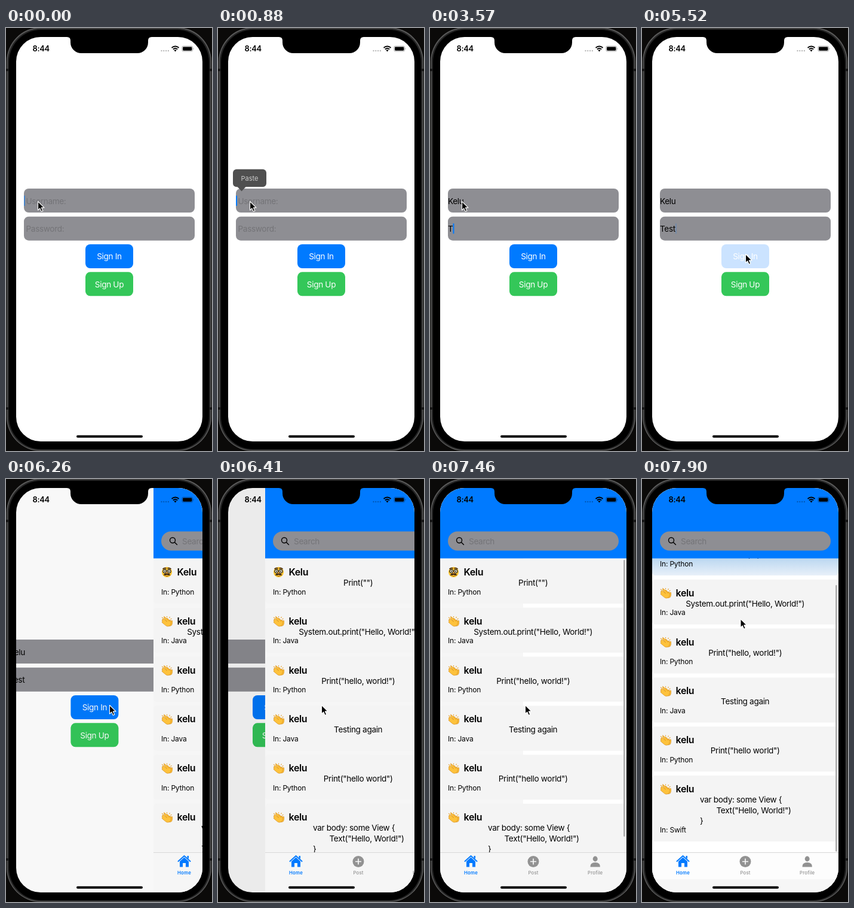
An HTML page for the animation above (8000 ms loop, 345 px wide and 706 px high).

```html
<!DOCTYPE html>
<html lang="en">
<head>
<meta charset="utf-8">
<title>Sign in and browse snippets</title>
<style>
  html, body { margin: 0; height: 100%; overflow: hidden; background: #0b0a09; }
  svg { display: block; width: 100%; height: 100%; }
  text { font: 13.6px Inter, sans-serif; letter-spacing: -.025em; white-space: pre; }
  .mid { text-anchor: middle; }
  .hint { fill: #747478; }
  .title { font-size: 16px; font-weight: 600; letter-spacing: -.022em; }
  .small { font-size: 12px; letter-spacing: -.016em; }
  .clock { font-size: 12.8px; font-weight: 600; letter-spacing: -.02em; }
  .paste { font-size: 11px; letter-spacing: 0; fill: #ccc; }
  .tab { font-size: 7.8px; font-weight: 500; letter-spacing: .02em; }
</style>
</head>
<body>
<svg viewBox="0 0 345 706">
  <defs>
    <clipPath id="screen"><rect x="17" y="15" width="312" height="675" rx="41"/></clipPath>
    <linearGradient id="tint" x2="0" y2="1">
      <stop offset=".6" stop-color="#b9d6f0"/><stop offset="1" stop-color="#e8f0f9"/>
    </linearGradient>
    <g id="face">
      <circle r="8.6" fill="#fdc530"/>
      <path d="M-7-5q3-3 6-1M1-6q3-2 6 1" fill="none" stroke="#3b2414" stroke-width="1.6"/>
      <g fill="#fff3d0" stroke="#222" stroke-width="1.3">
        <circle cx="-3.6" cy="-1.4" r="2.9"/><circle cx="3.6" cy="-1.4" r="2.9"/>
      </g>
      <circle cx="-3.4" cy="-1.2" r="1"/><circle cx="3.4" cy="-1.2" r="1"/>
      <path d="M0-1q2 2 1.500 4h-3q-.5-2 1.500-4" fill="#eea33b"/>
      <path d="M0 2.500q3-1 6 2.500-3 1.500-6-.5-3 2-6 .5 3-3.500 6-2.500" fill="#3b2414"/>
      <path d="M-2 6.500q2 1 4 0" fill="none" stroke="#8a4b12"/>
    </g>
    <g id="clap">
      <g fill="#fdc23c" stroke="#d98e1c" stroke-width=".7" stroke-linejoin="round">
        <path d="M-1-4q1.500-1.500 2.500 0l5 5q1-3 2.500-1.500.5 5-1 7.500-4 3-8-1z"/>
        <path d="M-7-2q-1-2 1-2l6 5-5-6q0-2 2-1.500l7 7q0-3 2-2 2 5 0 8-4 4-8 1l-6-5q-1-2 1-2l-1-1q-1-2 1-1.500"/>
      </g>
      <path d="M-5-8l1 2M-8.500-6l2 1M0-8v2M5-7l-1 2M8-4l-2 1" stroke="#e8a12b" stroke-width="1.1"/>
    </g>
  </defs>

  <rect x="1" y="-1" width="343" height="707" rx="57" fill="#5a5a5a"/>
  <rect x="2.500" y=".8" width="340" height="704" rx="56" fill="#262626"/>
  <rect x="5" y="3" width="335" height="700" rx="54"/>
  <path d="M1 70h4M340 70h4M1 635h4M340 635h4" stroke="#171717" stroke-width="4"/>

  <g clip-path="url(#screen)">
    <rect x="17" y="15" width="312" height="675" fill="#fff"/>
    <g id="login">
      <g fill="#8e8e93">
        <rect x="30" y="268" width="286" height="40" rx="8"/>
        <rect x="30" y="314.700" width="286" height="40" rx="8"/>
      </g>
      <text id="nameHint" class="hint" x="33.500" y="293.500">Username:</text>
      <text id="passHint" class="hint" x="33.500" y="340">Password:</text>
      <text id="nameText" x="30" y="293.500"></text>
      <text id="passText" x="30" y="340"></text>
      <rect id="caret" width="2" height="17.500" rx="1" fill="#007aff"/>
      <g id="signIn">
        <rect x="133" y="361" width="80" height="40" rx="8" fill="#007aff"/>
        <text class="mid" x="173" y="386" fill="#fff">Sign In</text>
      </g>
      <rect x="133" y="407.300" width="80" height="40" rx="8" fill="#34c759"/>
      <text class="mid" x="173" y="432.500" fill="#fff">Sign Up</text>
      <g id="popup">
        <path d="M32 264.500h15l-7.500 8z" fill="#4f4f4f"/>
        <rect x="25" y="235.700" width="56" height="29.500" rx="6" fill="#4f4f4f"/>
        <text class="mid paste" x="53" y="254.500">Paste</text>
      </g>
    </g>
    <rect id="dim" x="17" y="15" width="312" height="675"/>

    <g id="home">
      <rect x="17" y="15" width="312" height="675" fill="#f6f6f6"/>
      <rect id="gaps" y="132" width="312" height="492" fill="#fff"/>
      <g id="list"></g>
      <rect id="scrollbar" x="324" width="2.800" rx="1.400" fill="#b0b0b0"/>
      <rect x="17" y="15" width="312" height="117.500" fill="#007aff"/>
      <rect x="30" y="87.500" width="286" height="32" rx="16" fill="#8e8e93"/>
      <g fill="none" stroke="#000" stroke-width="1.400">
        <circle cx="49" cy="102.300" r="4.500"/><path d="M52.300 105.600l4.500 4.500"/>
      </g>
      <text class="hint" x="65" y="108.500">Search</text>
      <rect x="17" y="623.500" width="312" height="67" fill="#f6f6f6"/>
      <rect id="barLight" x="17" y="623.500" width="312" height="44.500" fill="#fdfdfd"/>
      <path d="M17 623.500h312" stroke="#d8d8d8"/>
      <g fill="#007aff">
        <path d="M58.500 638l10-9 10 9" fill="none" stroke="#007aff" stroke-width="2" stroke-linecap="round"/>
        <path d="M73.500 629h2.500v5l-2.500-2zM61 638.300l7.500-6.800 7.500 6.800v9.200h-5v-6.500h-5v6.500h-5z"/>
        <text class="tab mid" x="68.500" y="659.500" style="font-weight:600">Home</text>
      </g>
      <g fill="#929292">
        <circle cx="173" cy="638.500" r="9.500"/>
        <path d="M173 633.500v10M168 638.500h10" stroke="#f8f8f8" stroke-width="1.700"/>
        <text class="tab mid" x="173" y="659.500">Post</text>
        <ellipse cx="276.700" cy="634" rx="4" ry="4.400"/>
        <path d="M268.500 647.500q-.5-7.500 8.200-7.500t8.200 7.500z"/>
        <text class="tab mid" x="276.700" y="659.500">Profile</text>
      </g>
    </g>

    <text class="clock" x="44.500" y="39.300">8:44</text>
    <path d="M260.500 38h14" stroke="#000" stroke-opacity=".27" stroke-width="2.400" stroke-linecap="round" stroke-dasharray="0 3.800"/>
    <g fill="none" stroke="#000" stroke-width="1.900">
      <path d="M277.500 33q6-5 12 0M279.800 35.500q3.700-3 7.400 0"/>
    </g>
    <path d="M281.300 37q2.200-1.600 4.400 0l-2.200 2.500z"/>
    <rect x="294.700" y="30.200" width="18" height="8.800" rx="2.500" fill="none" stroke="#000" stroke-opacity=".4" stroke-width=".8"/>
    <rect x="296" y="31.500" width="15.400" height="6.200" rx="1.400"/>
    <path d="M313.700 33.300q1.600 1.300 0 2.600z" opacity=".5"/>
    <rect x="118" y="679.700" width="111" height="4" rx="2"/>
  </g>
  <path d="M102 14v1q6 0 6 6v3a18 18 0 0 0 18 18h94a18 18 0 0 0 18-18v-3q0-6 6-6v-1z"/>
  <path id="pointer" d="M0 0v14.500l3.300-3.100 2.400 5.400 2.600-1.100-2.400-5.300h4.600z" stroke="#fff" stroke-width="1.100" stroke-linejoin="round"/>
</svg>
<script>
const LOOP = 8000, TICK = 149, WIDTH = 312;
const el = id => document.getElementById(id);
const set = (id, attrs) => Object.entries(attrs).forEach(([key, value]) => el(id).setAttribute(key, value));
const move = (id, x, y) => set(id, { transform: `translate(${x} ${y})` });

const posts = [
  ['face', 'Kelu', 'Python', 'Print("")'],
  ['clap', 'kelu', 'Java', 'System.out.print("Hello, World!")'],
  ['clap', 'kelu', 'Python', 'Print("hello, world!")'],
  ['clap', 'kelu', 'Java', 'Testing again'],
  ['clap', 'kelu', 'Python', 'Print("hello world")'],
  ['clap', 'kelu', 'Swift', null],
];

const swiftCode = [[97, 45, 'var body: some View {'], [124.5, 62.5, 'Text("Hello, World!")'], [97, 80, '}']]
  .map(([x, y, line]) => `<text x="${x}" y="${y}">${line}</text>`).join('');

el('list').innerHTML = posts.map(([icon, author, language, code], i) => `
  <g transform="translate(0 ${133 + i * 81.8})">
    <rect id="card${i}" x="17" width="${WIDTH}" height="${code ? 75 : 110}" rx="5" fill="#f4f4f4"/>
    <use href="#${icon}" x="39.500" y="22.300"/>
    <text class="title" x="56.500" y="28">${author}</text>
    ${code ? `<text class="mid" x="172.700" y="45">${code}</text>` : swiftCode}
    <text class="small" x="30" y="${code ? 59.5 : 95}">In: ${language}</text>
  </g>`).join('');

// Linear interpolation through [tick, value] pairs.
function track(k, ...points) {
  const next = points.findIndex(p => p[0] > k);
  if (next === 0) return points[0][1];
  if (next < 0) return points[points.length - 1][1];
  const [[k0, v0], [k1, v1]] = [points[next - 1], points[next]];
  return v0 + (v1 - v0) * (k - k0) / (k1 - k0);
}

const typed = (word, k, start) => word.slice(0, Math.max(0, k - start + 1));

function drawLogin(k) {
  const name = typed('Kelu', k, 12), pass = typed('Test', k, 24);
  el('nameText').textContent = name;
  el('passText').textContent = pass;
  set('nameHint', { opacity: name ? 0 : 1 });
  set('passHint', { opacity: pass ? 0 : 1 });

  const onPass = k >= 20;
  const field = el(onPass ? 'passText' : 'nameText');
  const blink = track(k, [0, .5], [1, 1], [2, 1], [3, .3], [4, 0], [5, .6], [6, 1], [18, 1], [19, 0], [20, 1],
    [29, 1], [31, 0], [32, 0], [34, 1], [36, 1], [37, .2], [38, 0]);
  set('caret', {
    x: 30 + (field.textContent ? field.getComputedTextLength() : 0),
    y: onPass ? 326 : 279.5,
    opacity: blink,
  });
  set('popup', { opacity: track(k, [4, 0], [6, 1], [9, 1], [11, 0]) });
  set('signIn', { opacity: track(k, [36, 1], [37, .2], [38, .2], [40, 1]) });
}

function drawHome(k) {
  const offset = track(k, [41, WIDTH], [42, 230], [43, 62], [44, 12], [45, 2], [46, 0]);
  const shown = 1 - offset / WIDTH;
  move('home', offset, 0);
  move('login', -.3 * WIDTH * shown, 0);
  set('dim', { opacity: .1 * shown });

  const scroll = track(k, [50, 0], [51, 18], [52, 40], [53, 47]);
  const scrolling = k > 50;
  move('list', 0, -scroll);
  set('gaps', { x: scrolling ? 17 : 156, opacity: k >= 50 ? 1 : 0 });
  set('barLight', { opacity: scrolling ? 1 : 0 });
  set('card0', { fill: scrolling ? 'url(#tint)' : '#f4f4f4' });
  const top = 135 + scroll * 42 / 47, bottom = 597 + Math.min(25, scroll);
  set('scrollbar', { y: top, height: bottom - top, opacity: k >= 50 ? 1 : 0 });
}

function drawPointer(k) {
  const x = track(k, [28, 53.5], [29, 60], [31, 110], [33, 160], [35, 173.5], [45, 173.5], [48, 159.5], [50, 159.5], [53, 165]);
  const y = track(k, [28, 289.5], [29, 297], [31, 350], [33, 395], [35, 377.5], [50, 377.5], [51, 335], [52, 265], [53, 233.5]);
  move('pointer', x, y);
}

function frame() {
  const k = Math.floor((performance.now() % LOOP + 15) / TICK);
  drawLogin(k);
  drawHome(k);
  drawPointer(k);
  requestAnimationFrame(frame);
}
frame();
</script>
</body>
</html>
```
